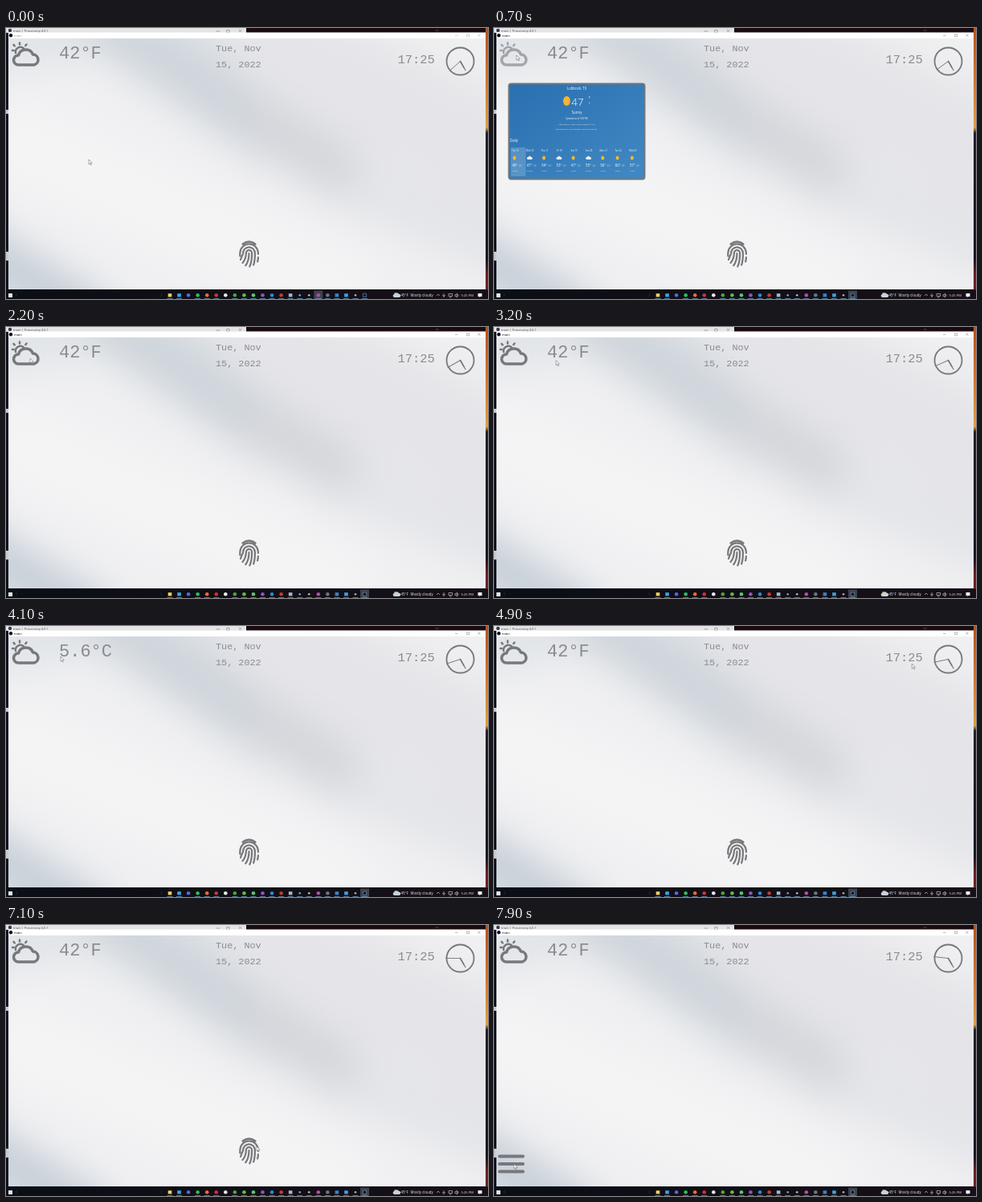
An HTML page for the animation above (8000 ms loop, 600 px wide and 338 px high).

```html
<!DOCTYPE html>
<html lang="en">
<head>
<meta charset="utf-8">
<title>Smart mirror desktop</title>
<style>
html, body { margin: 0; width: 100%; height: 100%; overflow: hidden; background: #0b0d13; }
svg { display: block; width: 100vw; height: 100vh; }
text { font-family: "Open Sans", sans-serif; }
.mono text { font-family: "Liberation Mono", monospace; fill: #8b8b8f; }
#calendar text { fill: #9d9da1; }
.line { fill: none; stroke: #77787b; stroke-linecap: round; stroke-linejoin: round; }
.mid text { text-anchor: middle; fill: #fff; }
</style>
</head>
<body>
<svg viewBox="0 0 600 338" preserveAspectRatio="none">
  <defs>
    <filter id="soft" x="-50%" y="-50%" width="200%" height="200%"><feGaussianBlur stdDeviation="24"/></filter>
    <clipPath id="view"><path d="M3 13H597V326H3z"/></clipPath>
    <linearGradient id="sky" x2="1" y2="1">
      <stop stop-color="#2a6fb0"/><stop offset="1" stop-color="#4189c4"/>
    </linearGradient>
    <linearGradient id="edge" x2="0" y2="1">
      <stop stop-color="#b8521a"/><stop offset=".2" stop-color="#d9742a"/>
      <stop offset=".38" stop-color="#e0a040"/><stop offset=".4" stop-color="#20232c"/>
      <stop offset=".88" stop-color="#161a24"/><stop offset=".94" stop-color="#6b2024"/>
    </linearGradient>
    <linearGradient id="bar">
      <stop stop-color="#0a0e15"/><stop offset="1" stop-color="#170f17"/>
    </linearGradient>
  </defs>

  <!-- desktop behind the window -->
  <path d="M0 0H600V338H0z" fill="#10131d"/>
  <path d="M300 0H600V6H300z" fill="#190b0e"/>
  <path d="M0 0H299V6H0z" fill="#e4e4e5"/>
  <circle cx="5" cy="3" r="2.2" fill="#333b52"/>
  <text x="9" y="5" font-size="4" fill="#555">main | Processing 4.0.1</text>
  <path class="line" stroke-width=".6" d="M262 4h4M275 2.5h3v3h-3zM290 2l3 3m0-3l-3 3M535 3h3"/>
  <path d="M597 0H600V327H597z" fill="url(#edge)"/>
  <path d="M0 102h3v5H0zM0 279h3v11H0z" fill="#c9ccd2"/>

  <!-- window -->
  <path d="M3 5.4H597V13H3z" fill="#fff"/>
  <circle cx="6" cy="9.2" r="2.2" fill="#0c1020"/>
  <text id="title" x="10" y="10.7" font-size="4.2">main</text>
  <path id="controls" fill="none" stroke-width=".5" d="M559 9.4h3.5M573.5 7.8h3v3h-3zM587.5 7.8l3 3m0-3l-3 3"/>
  <g clip-path="url(#view)">
    <path d="M3 13H597V326H3z" fill="#f0f0f2"/>
    <g filter="url(#soft)" fill="none">
      <path d="M-40 30L120 0L300 20" stroke="#dfe3e7" stroke-width="60"/>
      <path d="M280 0L680 190" stroke="#e5e5e9" stroke-width="140"/>
      <path d="M110 -20L240 70L340 140" stroke="#cdd4da" stroke-width="72"/>
      <path d="M300 110L440 195" stroke="#d3d5da" stroke-width="64"/>
      <path d="M430 195L660 290" stroke="#e4e5e9" stroke-width="70"/>
      <path d="M-20 130L250 250L440 340" stroke="#f5f4f5" stroke-width="90"/>
      <path d="M-60 260L120 370" stroke="#c3ccd5" stroke-width="60"/>
    </g>
  </g>

  <!-- weather button and readouts -->
  <g id="weatherIcon" class="line" stroke-width="3.5">
    <path d="M15.5 46a6 6 0 0 1 0-12a9.5 9.5 0 0 1 18-1a6.6 6.6 0 0 1 1.5 13z"/>
    <path stroke-width="2.5" d="M12 31a6 6 0 0 1 10-5.500M17 18.500v2M9.500 21l1.300 1.300M8 28h1.500M25.500 20.500l-1.200 1.500"/>
  </g>
  <g class="mono">
    <text id="temperature" x="66" y="37.5" font-size="22"></text>
    <text x="261" y="28.8" font-size="11.8">Tue, Nov</text>
    <text x="261" y="49" font-size="11.8">15, 2022</text>
    <text x="487.5" y="43.5" font-size="15.4">17:25</text>
  </g>

  <!-- clock: at 17:25 the hour and minute hands coincide -->
  <circle id="dial" class="line" cx="565.5" cy="41.5" r="17"/>
  <path class="line" stroke-width="1.6" d="M565.5 41.5l4.5 7.8"/>
  <path class="line" stroke-width="1.2" d="M565.5 41.5l6.500 11.300"/>
  <path id="secondHand" class="line" stroke-width=".9" d="M565.5 41.5v-18"/>

  <!-- fingerprint and menu buttons -->
  <path id="fingerprint" class="line" stroke-width="2.2" transform="translate(302.5 282)"
    d="M-8-12.500Q0-18.500 8-12.500M-11.200 2.500V-1A11.200 11.600 0 0 1 11.400-1V0M11.400 4Q11.300 7 10.600 9.500M-10.500 7C-8-1-7.400 1-7.400-1A7.400 7.700 0 0 1 7.400-1C7.400 5 7 10 5.600 13.500M-8 11C-4.500 7-3.800 4-3.600-1A3.600 3.800 0 0 1 3.600-1C3.600 6 3 11 .8 15.400M0-1C0 6-1 10-4.300 14.200"/>
  <path id="menu" class="line" stroke-width="4.2" d="M7 288.5H36M7 298H36M7 307.5H36"/>

  <!-- weather panel, completed by script -->
  <g id="weather" class="mid">
    <rect x="18.5" y="69.500" width="169" height="119" rx="3" fill="url(#sky)" stroke="#71777d" stroke-width="2"/>
    <path d="M21 149h18.5v36H21z" fill="#fff" opacity=".18"/>
    <text x="103" y="76.8" font-size="4.400">Lubbock, TX</text>
    <ellipse cx="90.5" cy="91" rx="4.400" ry="6" fill="#f9b52c"/>
    <text x="104" y="96.5" font-size="13.5" style="font-weight:300">47</text>
    <text x="119" y="87.5" font-size="4">F</text>
    <text x="119" y="94.5" font-size="4" opacity=".7">C</text>
    <text x="103" y="106.8" font-size="4.400">Sunny</text>
    <text x="103" y="114" font-size="2.600">Updated as of 5:09 PM</text>
    <text x="103" y="121" font-size="2.400">Feels like 45°   Wind 4 mph   Visibility 10 mi</text>
    <text x="103" y="126.5" font-size="2.400">Barometer 30.4 in   Humidity 34%   Dew Point 20°</text>
    <text x="25" y="142" font-size="4.400">Daily</text>
  </g>

  <!-- calendar, completed by script -->
  <g id="calendar" class="mono" font-size="8.2" text-anchor="middle">
    <path id="grid" class="line" stroke-width=".9"/>
    <circle class="line" cx="500.7" cy="140" r="7.8" stroke-width=".9"/>
  </g>

  <!-- taskbar -->
  <path d="M0 326.5H600V338H0z" fill="url(#bar)"/>
  <path d="M3 331h5v5H3z" fill="#e3e8ee"/>
  <path d="M13 331v4M193.5 331v4" stroke="#343a45" stroke-width=".6"/>
  <path id="activeTask" d="M-5.5 327.5h11V338h-11z" fill="#3c424d"/>
  <g id="tasks"></g>
  <g fill="#eef1f5">
    <circle cx="484.5" cy="331.5" r="1.3" fill="#f4bf46"/>
    <path d="M483.5 336a2 2 0 0 1 .3-4a3 3 0 0 1 5.4-.2a2.1 2.1 0 0 1-.2 4.2z" fill="#c6d2de"/>
    <text x="491.5" y="335" font-size="4.400">45°F</text>
    <text x="503.5" y="335" font-size="4.400">Mostly cloudy</text>
    <text x="566.5" y="335" font-size="4.100">5:25 PM</text>
    <path d="M587.500 331h5v4h-2l-1 1.500v-1.500h-2z"/>
  </g>
  <path d="M536 334l2-2l2 2M545 331v3m-1.500-1a1.500 1.500 0 0 0 3 0M545 335v1M551 331.500h4.500v3H551zM552 336h2.500M559 332.500h1l1.500-1.200v4.500l-1.500-1.200h-1zM562.500 332q1 1.500 0 3" fill="none" stroke="#dfe3e8" stroke-width=".6"/>

  <path id="cursor" d="M0 0V6L1.4 4.800L2.400 7L3.300 6.600L2.400 4.400H4.200z" fill="#fff" stroke="#55565a" stroke-width=".5"/>
</svg>

<script>
const LOOP = 8000;
const $ = id => document.getElementById(id);

function add(parent, tag, attributes, content = "") {
  const node = document.createElementNS("http://www.w3.org/2000/svg", tag);
  for (const name in attributes) node.setAttribute(name, attributes[name]);
  node.textContent = content;
  parent.append(node);
}

function buildForecast() {
  const panel = $("weather");
  const days = ["Tue", "Wed", "Thu", "Fri", "Sat", "Sun", "Mon"];
  const highs = [49, 47, 54, 53, 47, 55, 56, 60, 57];
  highs.forEach((high, i) => {
    const x = 26 + 18.3 * i;
    const cloudy = i === 1 || i === 3 || i === 5;
    const label = (dx, y, size, value, opacity = 1) =>
      add(panel, "text", { x: x + dx, y, "font-size": size, opacity }, value);
    label(.5, 154, 2.7, `${days[i % 7]} ${15 + i}`);
    if (cloudy) add(panel, "path", { d: `M${x - 2} 164a1.5 1.5 0 0 1 .3-3a2 2 0 0 1 3.7 0a1.5 1.5 0 0 1 .2 3z`, fill: "#e5eef6" });
    else add(panel, "ellipse", { cx: x - .5, cy: 162, rx: 2, ry: 2.6, fill: "#fbb931" });
    label(0, 172.5, 4.4, `${high}°`);
    label(7, 172.5, 2.8, `${high - 21}°`, .65);
    label(0, 178.5, 2.3, cloudy ? "Cloudy" : "Sunny");
  });
}

function buildCalendar() {
  const panel = $("calendar"), left = 453.5, top = 91, cell = 18.8;
  let lines = "";
  for (let i = 0; i < 8; i++) lines += `M${left + i * cell} ${top}v${6 * cell}`;
  for (let i = 0; i < 7; i++) lines += `M${left} ${top + i * cell}h${7 * cell}`;
  $("grid").setAttribute("d", lines);
  "Sun Mon Tue Wed Thu Fri Sat".split(" ").forEach((day, i) =>
    add(panel, "text", { x: left + 11 + i * cell, y: top - .5 }, day));
  for (let i = 0; i < 42; i++) {
    const date = new Date(2022, 9, 30 + i).getDate();
    add(panel, "text", { x: left + 9.8 + (i % 7) * cell, y: top + 17 + Math.floor(i / 7) * cell }, date);
  }
}

const taskX = i => 204 + 11.55 * i;
function buildTasks() {
  const tasks = $("tasks");
  const colors = ("#f3cf62 #38a5e8 #5865e0 #25c25d #ef6a32 #d42f32 #e6e8ec #4aa83a #67b83f #5bc277 #8c55c8 " +
    "#268bd8 #c63b32 #a5b8c8 #72a9c7 #b6bfca #b34ca8 #6b7683 #3b83c9 #39a3df #a8b2bb #3c95df").split(" ");
  const squares = [0, 1, 13, 18, 19, 21], dots = [14, 15, 20], idle = [2, 6];
  colors.forEach((fill, i) => {
    const x = taskX(i);
    if (squares.includes(i)) add(tasks, "rect", { x: x - 2.3, y: 331.2, width: 4.6, height: 4.2, fill });
    else add(tasks, "circle", { cx: x, cy: 333.2, r: dots.includes(i) ? 1.3 : 2.3, fill });
    if (!idle.includes(i)) add(tasks, "rect", { x: x - 3.5, y: 337.3, width: 7, height: .7, fill: "#6fa5cf" });
  });
  add(tasks, "circle", { cx: 446.5, cy: 333.2, r: 2.3, fill: "#0c1020", stroke: "#9aa2ad", "stroke-width": .5 });
}

// Pointer stops: time, x, y.
const stops = [
  [100, 103, 164], [400, 27, 33], [600, 28, 34], [1400, 28, 34], [2000, 30, 39],
  [2200, 30, 39], [2800, 78, 42], [3100, 78, 42], [3700, 68, 38], [4200, 68, 38],
  [4700, 506, 46], [4800, 506, 46], [5100, 560, 50], [5300, 560, 41], [6300, 560, 41],
  [6900, 312, 276], [7200, 312, 276], [7800, 25, 298], [8000, 25, 298]
];
function pointer(t) {
  const next = stops.findIndex(stop => t < stop[0]);
  if (next <= 0) return stops[0].slice(1);
  const [t0, x0, y0] = stops[next - 1], [t1, x1, y1] = stops[next];
  const p = (t - t0) / (t1 - t0), eased = p * p * (3 - 2 * p);
  return [x0 + (x1 - x0) * eased, y0 + (y1 - y0) * eased];
}

const show = (id, visible) => $(id).setAttribute("visibility", visible ? "visible" : "hidden");

function draw(t) {
  const focused = t >= 600;
  const weatherOpen = t >= 600 && t < 2200;
  const calendarOpen = t >= 5300 && t < 6300;
  const celsius = t >= 3900 && t < 4400;
  const menuOpen = t >= 7200;

  show("weather", weatherOpen);
  show("calendar", calendarOpen);
  show("menu", menuOpen);
  show("fingerprint", !menuOpen);
  $("weatherIcon").setAttribute("opacity", weatherOpen ? .6 : 1);
  $("dial").setAttribute("stroke-width", calendarOpen ? .9 : 1.8);
  $("temperature").textContent = celsius ? "5.6°C" : "42°F";
  $("title").setAttribute("fill", focused ? "#111" : "#999");
  $("controls").setAttribute("stroke", focused ? "#777" : "#aaa");
  $("activeTask").setAttribute("transform", `translate(${focused ? 446.5 : taskX(16)} 0)`);

  const seconds = 38 + Math.floor((t + 400) / 1000);
  $("secondHand").setAttribute("transform", `rotate(${seconds * 6} 565.5 41.5)`);
  $("cursor").setAttribute("transform", `translate(${pointer(t)})`);
}

buildForecast();
buildCalendar();
buildTasks();
const start = performance.now();
function frame() {
  draw((performance.now() - start) % LOOP);
  requestAnimationFrame(frame);
}
frame();
</script>
</body>
</html>
```
